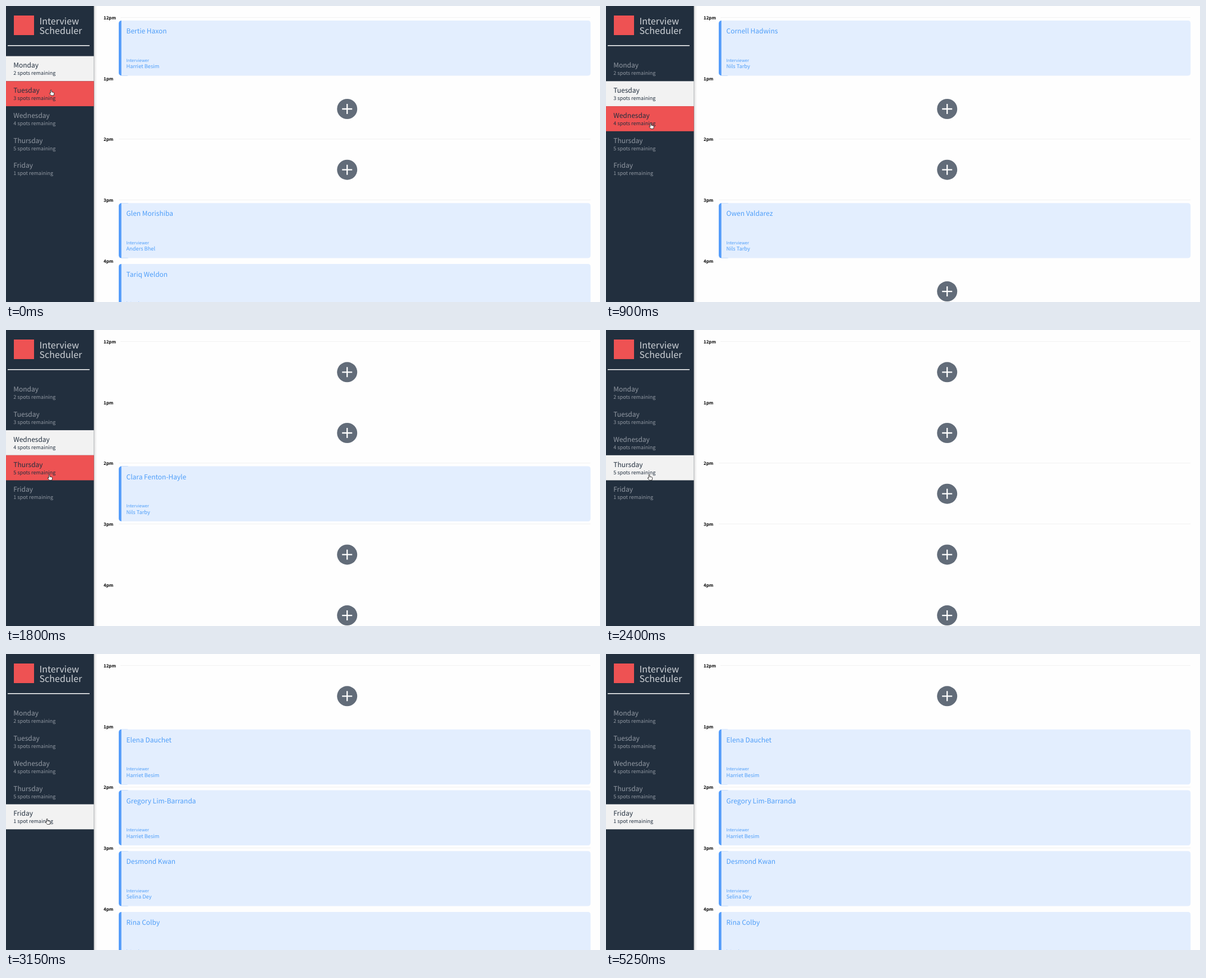
Animation of 1059 by 529 pixels, one loop 5400 ms. Source, as an HTML page:

```html
<!DOCTYPE html>
<html lang="en">
<head>
<meta charset="utf-8">
<title>Interview Scheduler</title>
<style>
  html, body { margin: 0; width: 100%; height: 100%; overflow: hidden; background: #fefefe; }
  svg { display: block; width: 1059px; height: 529px; }
  text {
    font-family: "Noto Sans CJK SC", "Noto Sans CJK JP", "Noto Sans CJK", "Open Sans", sans-serif;
    text-rendering: geometricPrecision;
  }
  .thin { font-weight: 300; }
  .brand { fill: #cfd3d8; }
  .row rect { fill: none; }
  .row text { fill: #9299a3; }
  .row.hot rect { fill: #ee5253; }
  .row.on rect { fill: #f2f2f2; }
  .row.hot text, .row.on text { fill: #222f3e; }
  .hour { font-weight: 700; fill: #000; }
  .card text { fill: #4e9ef9; }
  .card .host { font-weight: 500; }
</style>
</head>
<body>
<svg id="stage" viewBox="0 0 1059 529" xmlns="http://www.w3.org/2000/svg">
  <defs>
    <linearGradient id="shade">
      <stop offset="0" stop-color="#000" stop-opacity=".2"/>
      <stop offset=".4" stop-color="#000" stop-opacity=".06"/>
      <stop offset="1" stop-color="#000" stop-opacity="0"/>
    </linearGradient>
  </defs>
  <rect width="1059" height="529" fill="#fefefe"/>
  <g id="board"></g>
  <rect x="156.7" width="6" height="529" fill="url(#shade)"/>
  <rect width="156.7" height="529" fill="#222f3e"/>
  <rect x="14" y="17" width="36" height="35" fill="#ee5253"/>
  <g id="side"></g>
  <path d="M3 70.8H149" stroke="#fff" stroke-width="1.4"/>
  <path id="hand" fill="#fff" stroke="#111" stroke-width=".8" stroke-linejoin="round"
    d="M2.9 1.4a.9.9 0 0 1 1.8 0V4.1l3.5.8q1.4.4 1.2 1.8L8.7 10.4H4.3L1 7.2q-.5-1 .6-1.2l1.3.6z"/>
  <path id="arrow" fill="#111" stroke="#fff" stroke-width=".7"
    d="M.5 .5V9.2L2.5 7.4 3.8 10.4 5.2 9.8 3.9 6.9H6.6z"/>
</svg>
<script>
const LOOP = 5400, ROW = 44.74, SLOT = 108.7;
const $ = id => document.getElementById(id);

// Light text grows by the width it loses against the regular weight.
const pen = document.createElement('canvas').getContext('2d');
const span = weight => {
  pen.font = weight + ' 100px "Noto Sans CJK SC", "Noto Sans CJK JP", sans-serif';
  return pen.measureText('spots remaining').width;
};
const thinScale = span(400) / span(300);

const text = (x, y, size, str, cls = '') => {
  const px = cls.includes('thin') ? size * thinScale : size;
  return `<text x="${x}" y="${y}" font-size="${px.toFixed(2)}" class="${cls}">${str}</text>`;
};

const days = ['Monday', 'Tuesday', 'Wednesday', 'Thursday', 'Friday'];
const spots = [2, 3, 4, 5, 1];
const hours = ['12pm', '1pm', '2pm', '3pm', '4pm'];

const HB = 'Harriet Besim', NT = 'Nils Tarby';
// One list per day: slot -> [guest, interviewer]
const bookings = [
  { 0: ['Bertie Haxon', HB], 3: ['Glen Morishiba', 'Anders Bhel'], 4: ['Tariq Weldon', NT] },
  { 0: ['Cornell Hadwins', NT], 3: ['Owen Valdarez', NT] },
  { 2: ['Clara Fenton-Hayle', NT] },
  {},
  { 1: ['Elena Dauchet', HB], 2: ['Gregory Lim-Barranda', HB],
    3: ['Desmond Kwan', 'Selina Dey'], 4: ['Rina Colby', HB] }
];

// [time, selected day, hovered day]
const picks = [
  [0, 0, 1], [450, 1, -1], [750, 1, 2], [1350, 2, -1],
  [1650, 2, 3], [2400, 3, -1], [2700, 3, 4], [3150, 4, -1]
];
// [time, x, y]; no place means hidden
const handPath = [
  [0, 76.5, 149.5], [150, 76, 155.3], [600, 76, 169.3], [750, 76, 198], [900, 76, 209],
  [1500, 75.3, 235.3], [1650, 74, 257.5], [1800, 73.3, 258], [2550, 72.3, 279.2],
  [2700, 69.5, 294], [3900, 79.5, 283], [4050]
];
const arrowPath = [[0], [4950, 1044.5, 520], [5100, 1054, 527], [5250]];

const at = (steps, t) => steps.reduce((hit, s) => s[0] <= t ? s : hit);

const card = (y, [guest, host]) => `<g class="card">
  <rect x="201" y="${y}" width="20" height="98.4" rx="5" fill="#549cfa"/>
  <path d="M205.7 ${y}H1037.2q5 0 5 5v88.4q0 5 -5 5H205.7z" fill="#e3eefe"/>
  ${text(214.5, y + 23, 12, guest)}
  ${text(214.5, y + 73.5, 7.6, 'Interviewer', 'thin')}
  ${text(214.5, y + 85.2, 9.25, host, 'host')}</g>`;

const plus = y => `<circle cx="608.2" cy="${y}" r="18" fill="#626c79"/>
  <path d="M599.2 ${y}h18M608.2 ${y - 9}v18" stroke="#fff" stroke-width="2.3"/>`;

const board = day => hours.map((hour, i) => {
  const y = i * SLOT, slot = bookings[day][i];
  const rule = i === 1 || i === 4 ? ''
    : `<path d="M${i ? 201 : 204} ${y + 20.5}H1042" stroke="#f1f1f1"/>`;
  return rule + text(174, y + 24, 7.9, hour, 'hour')
    + (slot ? card(y + 26.1, slot) : plus(y + 75.3));
}).join('');

$('side').innerHTML =
  text(59.5, 33, 16.1, 'Interview', 'thin brand') +
  text(59.5, 49.5, 16.1, 'Scheduler', 'thin brand') +
  days.map((day, i) => {
    const y = 89.6 + i * ROW;
    return `<g class="row"><rect y="${y}" width="156.7" height="${ROW}"/>
      ${text(13.2, y + 20.8, 12, day)}
      ${text(13.2, y + 33.8, 9.1, `${spots[i]} spot${spots[i] > 1 ? 's' : ''} remaining`, 'thin')}</g>`;
  }).join('');
const rows = document.querySelectorAll('.row');

function place(el, [, x, y]) {
  el.style.display = x === undefined ? 'none' : '';
  if (x !== undefined) el.setAttribute('transform', `translate(${x} ${y})`);
}

let shown = -1;
function draw(t) {
  const [, day, hover] = at(picks, t);
  if (day !== shown) $('board').innerHTML = board(shown = day);
  rows.forEach((row, i) => {
    row.classList.toggle('on', i === day);
    row.classList.toggle('hot', i === hover);
  });
  place($('hand'), at(handPath, t));
  place($('arrow'), at(arrowPath, t));
}

const start = performance.now();
function tick() {
  draw((performance.now() - start) % LOOP);
  requestAnimationFrame(tick);
}
tick();
</script>
</body>
</html>
```
